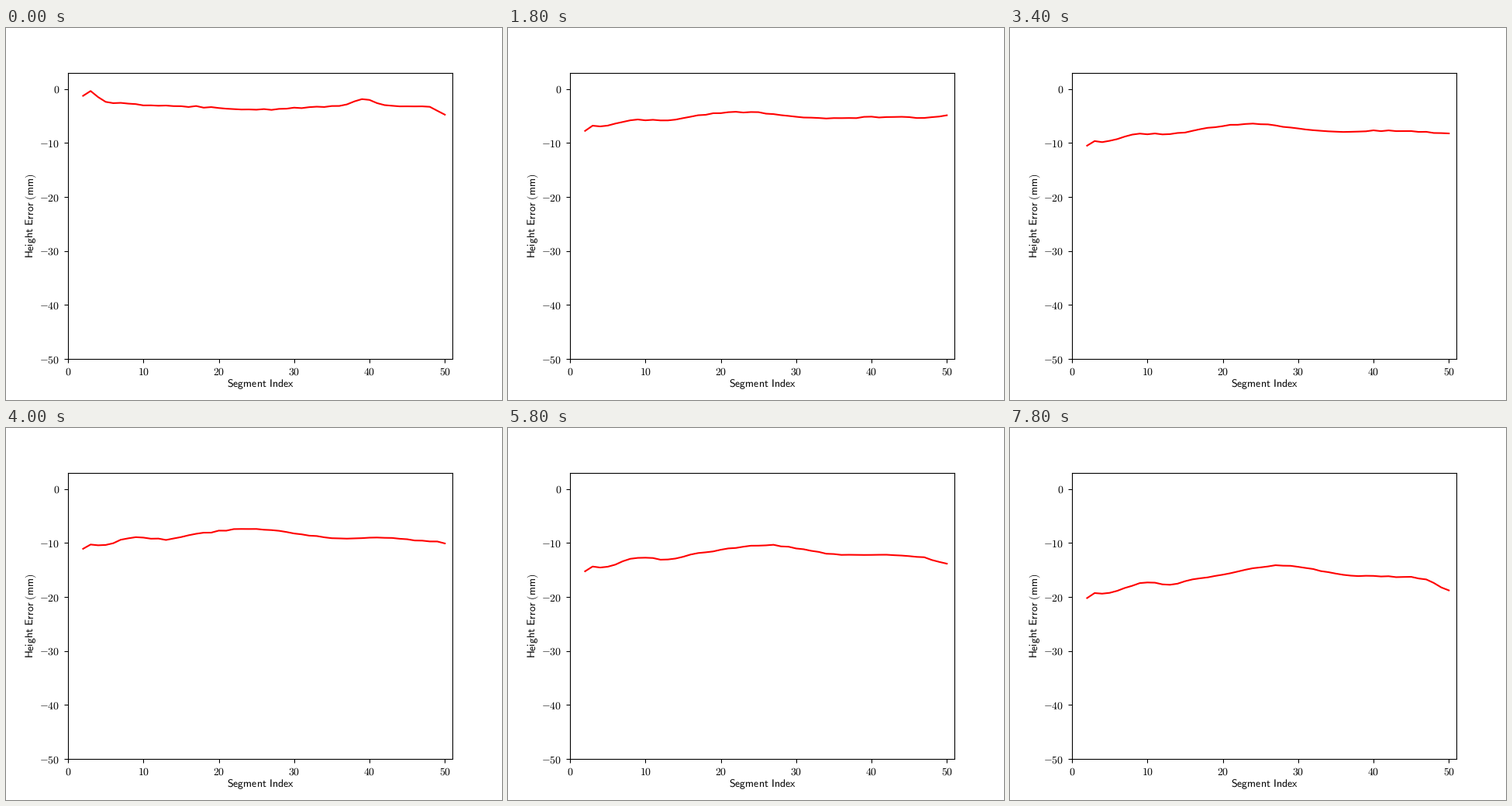
A matplotlib script that plays this animation: 640 by 480 pixels, repeating every 8 s.

```python
import numpy as np
import matplotlib.pyplot as plt
from matplotlib.animation import FuncAnimation

FRAMES = 40
INTERVAL = 200
SETTLE = 9  # steps until the opening shape has faded out

plt.rcParams.update({
    "font.family": "Liberation Serif",
    "font.size": 10,
    "mathtext.fontset": "cm",
    "text.hinting": "none",
})

x = np.arange(2, 51)
rough = np.random.default_rng(4).normal(0, 0.06, (FRAMES, x.size))


def bump(center, width):
    return np.exp(-((x - center) / width) ** 2)


def opening_shape():
    """Spike at the start, shallow sag, small peak, drop at the end."""
    return (2.5 * bump(2.8, 1.3) + 0.65 * bump(6, 4) - 0.65 * bump(25, 6)
            + 1.4 * bump(39.3, 1.8) - 1.7 * bump(50, 1.2))


def settled_shape(s):
    """Central arch that grows and drifts right while both ends sink."""
    arch = (1 + 0.04 * s) * bump(21 + 0.17 * s, 7.5)
    shoulder = 0.5 * bump(42, 5)
    hook = -1.3 * bump(2, 0.5)
    left = -(0.8 + 0.05 * s) * bump(4, 2.5 + 0.04 * s)
    dip = -(0.2 + 0.02 * s) * bump(13, 2.5)
    right = (1.5 - 0.09 * s) * bump(50, 2)
    tilt = -0.085 * (x - 26) * np.exp(-((s - 24) / 3.5) ** 2)
    return arch + shoulder + hook + left + dip + right + tilt


def height_error(s):
    level = -3.2 - 0.25 * s - 0.0025 * s ** 2
    mix = min(s / SETTLE, 1)
    shape = (1 - mix) * opening_shape() + mix * settled_shape(s)
    return level + shape + rough[s]


def math_labels(values):
    return [f"${v}$" for v in values]


fig, ax = plt.subplots(figsize=(6.4, 4.8), dpi=100)
ax.set_xlim(0, 51)
ax.set_ylim(-50, 3)
xticks = range(0, 51, 10)
yticks = range(-50, 1, 10)
ax.set_xticks(xticks, math_labels(xticks))
ax.set_yticks(yticks, math_labels(yticks))
ax.tick_params(axis="y", pad=4)
ax.set_xlabel(r"$\mathsf{Segment\ Index}$", labelpad=0.5)
ax.set_ylabel(r"$\mathsf{Height\ Error\ (mm)}$", labelpad=1.5)
line, = ax.plot(x, height_error(0), color="red", lw=1.5)


def update(step):
    line.set_ydata(height_error(step))
    return line,


anim = FuncAnimation(fig, update, frames=FRAMES, interval=INTERVAL,
                     repeat=True, repeat_delay=0)
plt.show()
```
